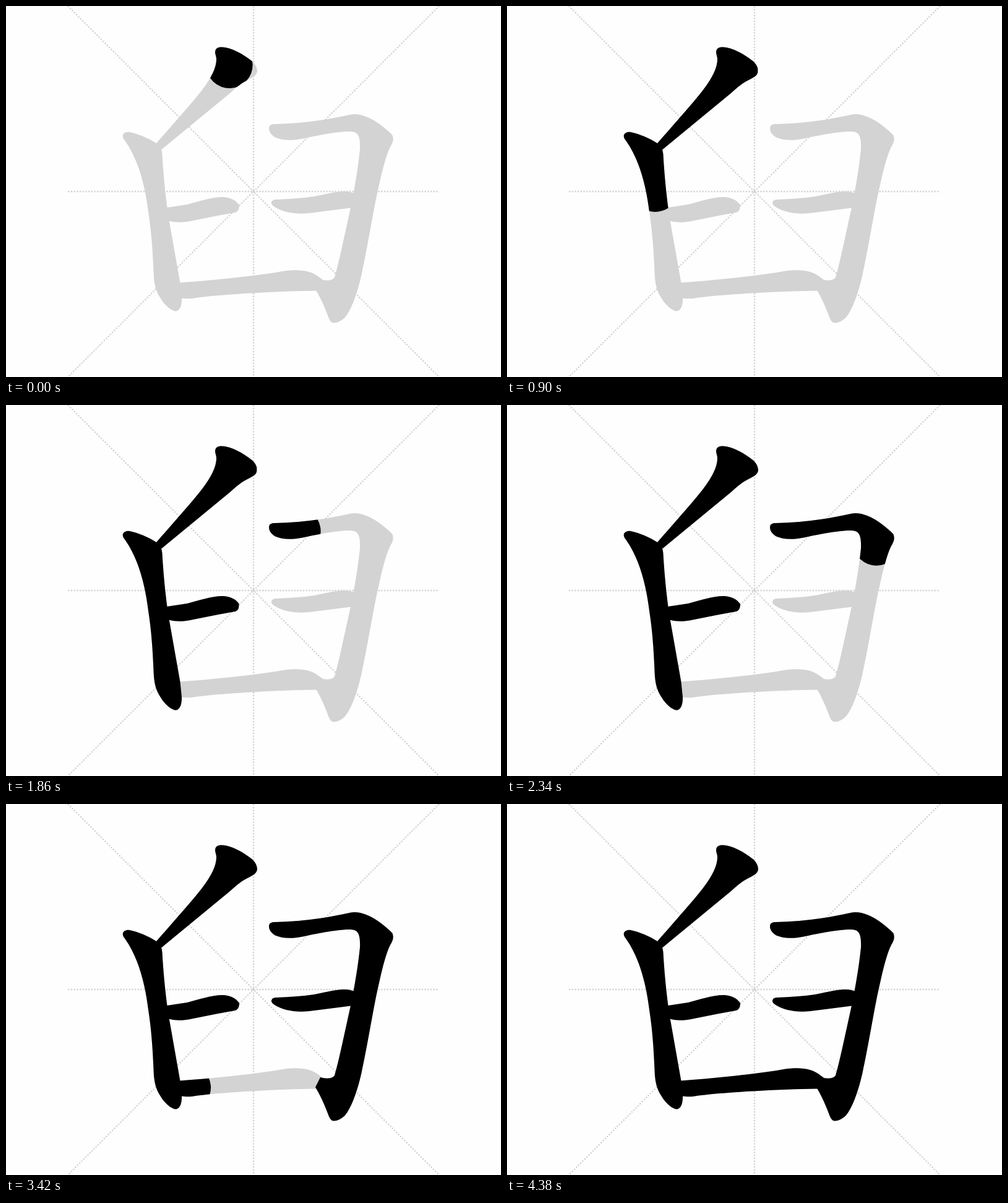
These frames come from a looping animation (800x600 px, 4.44 s). An HTML page:

```html
<!DOCTYPE html>
<html lang="zh">
<head>
<meta charset="utf-8">
<title>臼</title>
<style>
@property --t { syntax: "<number>"; inherits: true; initial-value: 0; }

html, body { margin: 0; width: 100%; height: 100%; overflow: hidden; background: #fefefe; }
svg { display: block; width: 100vw; height: 100vh; animation: clock 4440ms steps(74) infinite; }

/* --t is the time in ms, advanced in 60 ms ticks */
@keyframes clock { from { --t: 0; } to { --t: 4440; } }

.grid { stroke: #d3d3d3; stroke-width: 2.34375; stroke-dasharray: 2.34375 2.34375; }
.shape { fill: #d3d3d3; }

/* --s start, --d duration, --f moment after which the whole shape is inked */
.ink path {
  fill: none;
  stroke: #000;
  stroke-linecap: round;
  stroke-linejoin: round;
  stroke-dasharray: 100px 200px;
  stroke-dashoffset: clamp(0px, 100px - (var(--t) - var(--s)) / var(--d) * 100px, 99.9px);
  stroke-width: calc(clamp(0px, (var(--t) - var(--s) + 1) * 999px, 75px)
    + clamp(0px, (var(--t) - var(--f)) * 99px, 700px));
}
</style>
</head>
<body>
<svg viewBox="0 0 800 600" preserveAspectRatio="none">
  <defs>
    <path id="s1" d="M338 75C338 68 343 66 350 66.500C364 67 384 78 398 89.500C403 94 406 100 406 106C405 112 400 115 390 120C380 125 373 131 362 141L251 232.500L243 222L291 167Q305 151 316 137Q340 106 340 86C340 82 338 78 338 75Z"/>
    <path id="s2" d="M188.700 210C189 206 194 203 200 204C214 207 229 213 243 222C249 227 252 232 252.500 240C254 268 257 300 260.500 326L264 349L281.500 448L284 472C284.500 484 281 493.500 274 493.500C268 493 257 485 250 473C242 461 239 449 238.500 430C237 395 235 365 230 333C225.500 296 215.500 251 193 219C190 215 188.700 213 188.700 210Z"/>
    <path id="s3" d="M256 327L260 326L293 321C312 316 332 309 350 309C361 309 372 314 377 322C377 328 375 333 370 334L340 339.500L295 348.500C282 350.500 273 350 263 347.500L258 346Z"/>
    <path id="s4" d="M425 198C425 193 428 191 434 191C475 190 515 185 555 176Q576 171 605 192C613 198 620 204 624.500 209C627 216 625.500 221 621 228C612 246 605 280 598 312C591 347 583 396 574.500 435C567 468 557 493 548 503.500C542 509.500 535 512.500 530 512.500C525 512.500 523 508 521 503C515 487 509 473 500 458L508 442C518 445 528 444 531 439C537 420 547 371 557 326C563 297 569 262 572 232C573 208 568 203 555 203C535 203 505 209 482 214C460 218.500 447 217.500 435 212.500C428 208 425 203 425 198Z"/>
    <path id="s5" d="M429 319C429 315 432 313 437 313C458 312 478 311 498 308C518 304 532 300 548 300C554 300 559 301 564 304L560 326.500L557 326.500L490 335C466 337.500 448 333 435 325.500C431 323 429 321 429 319Z"/>
    <path id="s6" d="M279 447.500L281 447.500C330 444 390 438 436 431C456 427 464 427 474 427.500C491 428 501 434 512 443L514 450L506 460.500L501 460.500C440 461.500 360 465.500 310 471.500C297 474 290 473.500 284 472.500L281 471Z"/>
    <clipPath id="c1"><use href="#s1"/></clipPath>
    <clipPath id="c2"><use href="#s2"/></clipPath>
    <clipPath id="c3"><use href="#s3"/></clipPath>
    <clipPath id="c4"><use href="#s4"/></clipPath>
    <clipPath id="c5"><use href="#s5"/></clipPath>
    <clipPath id="c6"><use href="#s6"/></clipPath>
  </defs>

  <g class="grid">
    <path d="M100 0L700 600"/>
    <path d="M700 0L100 600"/>
    <path d="M400 0V600"/>
    <path d="M100 300H700"/>
  </g>

  <g class="shape">
    <use href="#s1"/><use href="#s2"/><use href="#s3"/>
    <use href="#s4"/><use href="#s5"/><use href="#s6"/>
  </g>

  <g class="ink">
    <g clip-path="url(#c1)"><path pathLength="100" style="--s:0;--d:530;--f:2220" d="M361 95.500L368 102L345 130L268 205"/></g>
    <g clip-path="url(#c2)"><path pathLength="100" style="--s:540;--d:985;--f:1500" d="M202 210L222 232L240 295L262 460"/></g>
    <g clip-path="url(#c3)"><path pathLength="100" style="--s:1530;--d:220;--f:2220" d="M272 338L300 333L339 324"/></g>
    <g clip-path="url(#c4)"><path pathLength="100" style="--s:1756;--d:1441;--f:3180" d="M440 203L471 204L563 190L593 206L597 221L569 363L533 470"/></g>
    <g clip-path="url(#c5)"><path pathLength="100" style="--s:3200;--d:190;--f:3360" d="M445 320L480 322L527 315"/></g>
    <g clip-path="url(#c6)"><path pathLength="100" style="--s:3390;--d:1040;--f:4320" d="M288 459L440 447L482 446"/></g>
  </g>
</svg>
</body>
</html>
```
